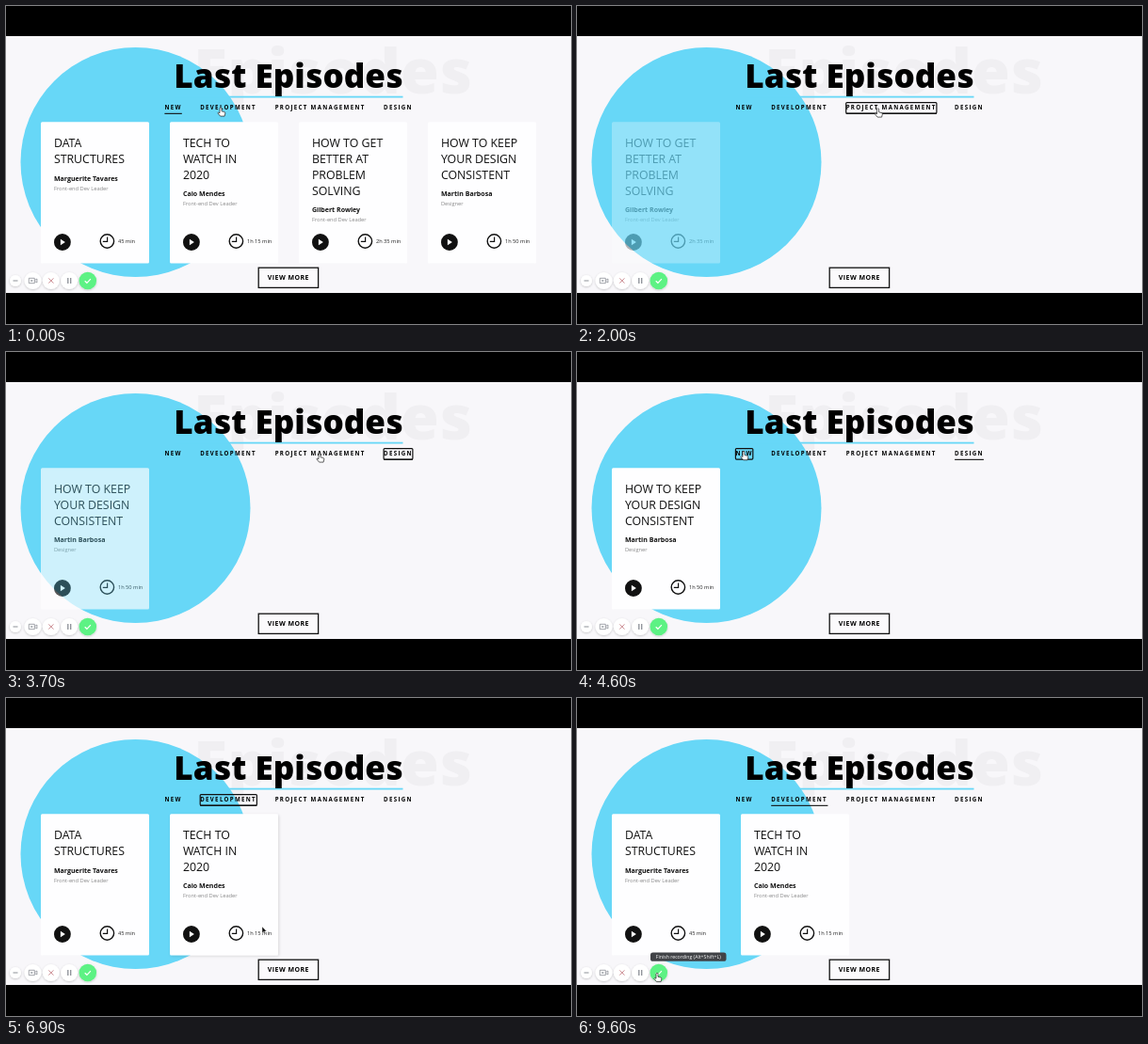
Write an HTML page that moves like this. It is 600x338 px and loops after 9700 ms.

```html
<!DOCTYPE html>
<html lang="en">
<head>
<meta charset="utf-8">
<title>Last Episodes</title>
<style>
  html, body { margin: 0; width: 100%; height: 100%; overflow: hidden; background: #000; }
  svg { display: block; width: 600px; height: 338px; font-family: "Open Sans", sans-serif; }
  .heavy { font-weight: 800; text-anchor: middle; }
  .nav { font-weight: 700; font-size: 6.15px; letter-spacing: 1.32px; }
  .more { font-weight: 700; font-size: 7.03px; letter-spacing: .44px; }
  .head { font-size: 12.35px; fill: #111; }
  .name { font-size: 7.05px; font-weight: 700; fill: #111; }
  .role { font-size: 5.73px; fill: #888; }
  .time { font-size: 5.7px; fill: #222; }
  .tip { font-size: 5.2px; fill: #fff; text-anchor: middle; }
</style>
</head>
<body>
<svg id="stage" viewBox="0 0 600 338">
  <defs>
    <filter id="soft" x="-30%" y="-30%" width="160%" height="160%">
      <feDropShadow dx="0" dy=".8" stdDeviation="1.1" flood-opacity=".22"/>
    </filter>
    <filter id="lift" x="-10%" y="-10%" width="120%" height="120%">
      <feDropShadow dx="1" dy="1" stdDeviation="1.5" flood-opacity=".13"/>
    </filter>
  </defs>
  <rect width="600" height="338" fill="#000"/>
  <rect y="32" width="600" height="273" fill="#f8f7fa"/>
  <text class="heavy" x="347" y="93" font-size="66" fill="#f0eff2">Episodes</text>
  <circle cx="137.5" cy="166" r="122" fill="#67d7f7"/>
  <rect x="179" y="95.7" width="242.5" height="1.8" fill="#67d7f7"/>
  <text class="heavy" x="300" y="87" font-size="35.1">Last Episodes</text>
  <g id="nav"></g>
  <g id="cards"></g>
  <rect x="268.2" y="278.2" width="63.4" height="21.2" fill="#fbfafc" stroke="#111" stroke-width="1.3"/>
  <text class="more" x="277.8" y="290.5">VIEW MORE</text>
  <g fill="#fff" filter="url(#soft)">
    <circle cx="10" cy="292" r="6"/>
    <circle cx="28.5" cy="292" r="9"/>
    <circle cx="47.8" cy="292" r="9"/>
    <circle cx="67.2" cy="292" r="9"/>
    <circle cx="86.8" cy="292" r="9.3" fill="#5df284"/>
  </g>
  <g fill="none" stroke="#8b8f96" stroke-width="1">
    <path d="M7.5 292h5"/>
    <path d="M24.3 289.3h6v5.4h-6zM30.6 291.4l2.3-1.4v4l-2.3-1.4M26.3 291l2 2m0-2l-2 2" stroke-width=".8"/>
    <path d="M45.2 289.4l5.2 5.2m0-5.2l-5.2 5.2" stroke="#c9868c"/>
    <path d="M65.8 289v6M68.7 289v6" stroke-width="1.3"/>
    <path d="M83.7 292.2l2.2 2.1 4-4.2" stroke="#fff" stroke-width="1.2"/>
  </g>
  <g id="tip">
    <rect x="78" y="270.6" width="80.5" height="9.2" rx="2.6" fill="#414347"/>
    <text class="tip" x="118.2" y="277">Finish recording (Alt+Shift+L)</text>
  </g>
  <g id="cursor">
    <path id="hand" fill="#fff" stroke="#222" stroke-width=".7" stroke-linejoin="round"
      d="M-1 .8a1 1 0 0 1 2 0v3l2.9.7q1.1.4.9 1.6l-.7 3h-4.5l-2.7-3.2q.2-1.5 2.1-.2z"/>
    <path id="arrow" fill="#111" stroke="#fff" stroke-width=".4"
      d="M0 0v6.8l1.6-1.4 1.1 2.5 1-.5-1.1-2.4h2.2z"/>
  </g>
</svg>
<script>
const LOOP = 9700, STEP = 100, FADE = 1000;
const $ = id => document.getElementById(id);

function add(parent, tag, attrs, text) {
  const el = document.createElementNS("http://www.w3.org/2000/svg", tag);
  for (const key in attrs) el.setAttribute(key, attrs[key]);
  if (text) el.textContent = text;
  return parent.appendChild(el);
}
const show = (el, on) => el.setAttribute("visibility", on ? "visible" : "hidden");

const tabs = [
  ["NEW", 168.4, 18.4], ["DEVELOPMENT", 206.2, 60.2],
  ["PROJECT MANAGEMENT", 285.7, 96.2], ["DESIGN", 401.1, 30.8]
].map(([label, x, w]) => {
  const g = $("nav");
  add(g, "text", { class: "nav", x, y: 109.7 }, label);
  return {
    x, w,
    line: add(g, "rect", { x, y: 113.8, width: w, height: 1.1, fill: "#111" }),
    ring: add(g, "rect", { x, y: 102.6, width: w, height: 11.5, rx: 1, fill: "none", stroke: "#111", "stroke-width": 1.2 })
  };
});

const cards = [
  ["DATA|STRUCTURES", "Marguerite Tavares", "Front-end Dev Leader", "45 min"],
  ["TECH TO|WATCH IN|2020", "Caio Mendes", "Front-end Dev Leader", "1h 15 min"],
  ["HOW TO GET|BETTER AT|PROBLEM|SOLVING", "Gilbert Rowley", "Front-end Dev Leader", "2h 35 min"],
  ["HOW TO KEEP|YOUR DESIGN|CONSISTENT", "Martin Barbosa", "Designer", "1h 50 min"]
].map(([head, name, role, time]) => {
  const g = add($("cards"), "g", {});
  const lines = head.split("|"), y = 152 + 16.8 * lines.length;
  const face = add(g, "rect", { y: 123.2, width: 115, height: 150.4, rx: 1.5, fill: "#fefeff" });
  lines.forEach((s, i) => add(g, "text", { class: "head", x: 13.9, y: 150.4 + 16.8 * i }, s));
  add(g, "text", { class: "name", x: 13.9, y }, name);
  add(g, "text", { class: "role", x: 13.9, y: y + 10 }, role);
  add(g, "circle", { cx: 22.9, cy: 251, r: 8.9, fill: "#111" });
  add(g, "path", { d: "M20.9 247.8v6.4l5-3.2z", fill: "#fff" });
  add(g, "circle", { cx: 70.4, cy: 250, r: 7.2, fill: "none", stroke: "#111", "stroke-width": 1.4 });
  add(g, "path", { d: "M70.6 245.4v4.9h-4.8", fill: "none", stroke: "#111", "stroke-width": 1.2 });
  add(g, "text", { class: "time", x: 81.9, y: 251.6 }, time);
  return { g, face };
});

// time, active tab, visible cards
const views = [
  [0, 0, [0, 1, 2, 3]], [400, 1, [0, 1]], [1800, 2, [2]],
  [3300, 3, [3]], [4820, 0, [0, 1, 2, 3]], [6200, 1, [0, 1]]
];
// time, focused tab
const focus = [[0, -1], [100, 1], [1600, 2], [2900, 3], [4400, 0], [6000, 1], [9600, -1]];
// time, x, y
const route = [
  [0, 228, 108], [1300, 230, 108], [1600, 319, 109], [2400, 320, 109], [2800, 417, 109],
  [3450, 417, 109], [3700, 333, 108], [4200, 177, 106], [5500, 177, 105], [5900, 235, 108],
  [6350, 235, 108], [6900, 272, 243], [7100, 274, 247], [7500, 300, 288], [7700, 298, 289],
  [8500, 85, 292.5], [9700, 85, 292.5]
];

const last = (list, t) => list.reduce((k, item, i) => item[0] <= t ? i : k, 0);
const bez = (a, b, u) => 3 * a * u * (1 - u) ** 2 + 3 * b * u * u * (1 - u) + u ** 3;

function ease(p) {
  if (p >= 1) return 1;
  let lo = 0, hi = 1;
  for (let i = 0; i < 20; i++) {
    const mid = (lo + hi) / 2;
    if (bez(.25, .25, mid) < p) lo = mid; else hi = mid;
  }
  return bez(.1, 1, lo);
}

function pointer(t) {
  const i = Math.min(last(route, t), route.length - 2);
  const [t0, x0, y0] = route[i], [t1, x1, y1] = route[i + 1];
  const p = (t - t0) / (t1 - t0), s = p * p * (3 - 2 * p);
  return [x0 + (x1 - x0) * s, y0 + (y1 - y0) * s];
}

const inside = (x, y, l, t, w, h) => x >= l && x <= l + w && y >= t && y <= t + h;

function draw(t) {
  const k = last(views, t), [start, active, shown] = views[k];
  const before = k ? views[k - 1][2] : shown;
  const focused = focus[last(focus, t)][1];
  const [x, y] = pointer(t);

  tabs.forEach((tab, i) => {
    show(tab.line, i === active);
    show(tab.ring, i === focused);
  });
  cards.forEach(({ g, face }, i) => {
    const slot = shown.indexOf(i), left = 37 + 137 * slot;
    show(g, slot >= 0);
    if (slot < 0) return;
    g.setAttribute("transform", `translate(${left} 0)`);
    g.setAttribute("opacity", before.includes(i) ? 1 : ease((t - start) / FADE));
    face.setAttribute("filter", inside(x, y, left, 123, 115, 150) ? "url(#lift)" : "none");
  });

  const link = tabs.some(tab => inside(x, y, tab.x, 102, tab.w, 13))
    || inside(x, y, 268, 278, 64, 22) || inside(x, y, 78, 283, 18, 18);
  $("cursor").setAttribute("transform", `translate(${x} ${y})`);
  show($("hand"), link);
  show($("arrow"), !link);
  show($("tip"), t >= 8600);
}

const origin = performance.now();
function tick() {
  const t = (performance.now() - origin) % LOOP;
  draw(Math.floor(t / STEP) * STEP);
  requestAnimationFrame(tick);
}
draw(0);
requestAnimationFrame(tick);
</script>
</body>
</html>
```
